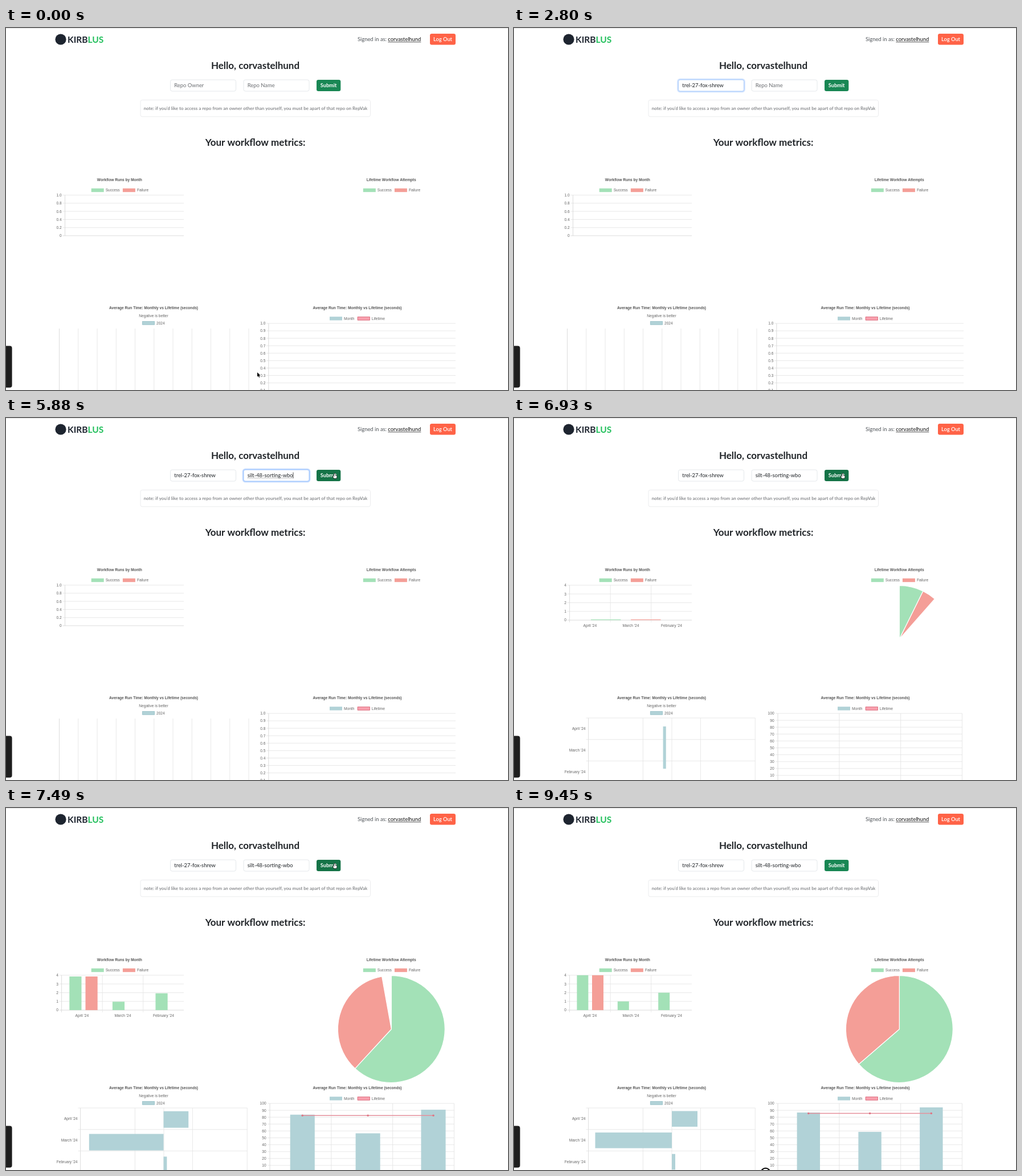
Write an HTML page with a canvas that moves like this. It is 881 by 636 pixels and loops after 9.52 s.

```html
<!DOCTYPE html>
<html lang="en">
<head>
<meta charset="utf-8">
<title>Workflow metrics</title>
<style>
html, body { margin: 0; width: 100%; height: 100%; overflow: hidden; background: #fff; }
canvas { display: block; width: 881px; height: 636px; }
</style>
</head>
<body>
<canvas id="stage"></canvas>
<script>
const W = 881, H = 636, LOOP = 9520, STEP = 70;
const canvas = document.getElementById('stage');
const ctx = canvas.getContext('2d');
const ratio = window.devicePixelRatio || 1;
canvas.width = W * ratio;
canvas.height = H * ratio;

const UI = 'Lato, "Open Sans", sans-serif';
const PLOT = '"Liberation Sans", Arial, sans-serif';
const INK = '#212529', GREEN = '#a3e1b7', RED = '#f49e97', TEAL = '#b1d2d7';
const PINK = '#f9a0ae', ROSE = '#dd7685', GRID = '#e3e3e3', AXIS = '#d4d4d4';
const USER = 'corvastelhund', OWNER = 'trel-27-fox-shrew', REPO = 'silt-48-sorting-wbo';
const MONTHS = ["April '24", "March '24", "February '24"];
const LOADED = 6930;

// Pointer route: time, x, y
const ROUTE = [
  [0, 441, 605], [140, 470, 540], [280, 640, 260], [385, 756, 24], [490, 650, 40],
  [630, 420, 95], [700, 351, 110], [770, 351, 110], [980, 337, 99.5], [1470, 337, 99.5],
  [1750, 520, 80], [1960, 886, 27], [3570, 886, 24], [3640, 778, 25], [3780, 650, 60],
  [3990, 480, 108], [4060, 457.7, 105], [5110, 457.7, 105], [5180, 461, 108],
  [5390, 510, 117], [5600, 560, 107], [5740, 577, 97.7], [8120, 577, 97.7],
  [8190, 575, 105], [8540, 520, 330], [8820, 450, 590], [8890, 441, 623], [8960, 441.5, 641]
];

const clamp = v => Math.max(0, Math.min(1, v));
const within = (t, a, b) => t >= a && t < b;
const mix = (a, b, p) => a + (b - a) * p;
function ramp(t, a, b) {
  const p = clamp((t - a) / (b - a));
  return p * p * (3 - 2 * p);
}
const easeOut = p => 1 - Math.pow(1 - clamp(p), 4);

function text(str, x, y, size, color, align = 'left', weight = 400, family = UI) {
  ctx.font = `${weight} ${size}px ${family}`;
  ctx.textAlign = align;
  ctx.fillStyle = color;
  ctx.fillText(str, x, y);
  return ctx.measureText(str).width;
}
// Chart text, placed by its vertical middle
const label = (str, x, y, align = 'left', weight = 400) =>
  text(str, x, y + 2.4, 6.6, weight > 400 ? '#555' : '#666', align, weight, PLOT);

function rect(x, y, w, h, color) {
  ctx.fillStyle = color;
  ctx.fillRect(x, y, w, h);
}
function line(x1, y1, x2, y2, color = GRID, width = 0.8) {
  ctx.strokeStyle = color;
  ctx.lineWidth = width;
  ctx.beginPath();
  ctx.moveTo(x1, y1);
  ctx.lineTo(x2, y2);
  ctx.stroke();
}
function box(x, y, w, h, r, fill, stroke, width = 0.8) {
  ctx.beginPath();
  ctx.roundRect(x, y, w, h, r);
  if (fill) { ctx.fillStyle = fill; ctx.fill(); }
  if (stroke) { ctx.strokeStyle = stroke; ctx.lineWidth = width; ctx.stroke(); }
}
function disc(x, y, r, color) {
  ctx.fillStyle = color;
  ctx.beginPath();
  ctx.arc(x, y, r, 0, 7);
  ctx.fill();
}
function clipped(x, y, w, h, draw) {
  ctx.save();
  ctx.beginPath();
  ctx.rect(x, y, w, h);
  ctx.clip();
  draw();
  ctx.restore();
}
function legend(x, y, color, name, border) {
  rect(x, y - 3.2, 22, 6.4, color);
  if (border) {
    ctx.strokeStyle = border;
    ctx.lineWidth = 1;
    ctx.strokeRect(x + 0.4, y - 2.8, 21.2, 5.6);
  }
  label(name, x + 25, y);
}

function pointerAt(t) {
  let i = 0;
  while (i < ROUTE.length - 1 && ROUTE[i + 1][0] <= t) i++;
  const a = ROUTE[i], b = ROUTE[i + 1] || a;
  const p = b === a ? 0 : (t - a[0]) / (b[0] - a[0]);
  return { x: mix(a[1], b[1], p), y: mix(a[2], b[2], p) };
}
const over = (p, x, y, w, h) => p.x >= x && p.x <= x + w && p.y >= y && p.y <= y + h;

function field(x, value, hint, glow) {
  if (glow > 0) box(x - 1.1, 89.9, 117.2, 22.2, 4, null, `rgba(13,110,253,${0.25 * glow})`, 2.4);
  const edge = [mix(222, 134, glow), mix(226, 183, glow), mix(230, 254, glow)].map(Math.round);
  box(x, 91, 115, 20, 3.2, '#fff', `rgb(${edge})`);
  text(value || hint, x + 6.8, 104.2, 9.4, value ? INK : '#6b6e72');
  return value ? x + 6.8 + ctx.measureText(value).width : x + 7;
}
const caret = x => line(x + 0.4, 95.5, x + 0.4, 106, '#222', 0.8);

function header() {
  rect(0, 0, W, 1, '#e4e4e4');
  disc(96, 20, 9.6, '#1e2530');
  const w = text('KIRB', 108, 25.6, 15.5, '#1e2530', 'left', 700);
  text('LUS', 108 + w, 25.6, 15.5, '#21bf5b', 'left', 700);
  text('Signed in as:', 617, 23.2, 9.4, '#50555a');
  const u = text(USER, 670.3, 23.2, 9.4, '#111');
  line(670.3, 24.7, 670.3 + u, 24.7, '#111', 0.7);
  box(744, 10, 45, 19.5, 3.2, '#ff6347');
  text('Log Out', 766.5, 23.2, 9.3, '#fff', 'center', 600);
  text('Hello, ' + USER, 437.5, 71.7, 17, INK, 'center', 700);
  box(236, 126.5, 403.5, 29.3, 3.2, null, '#e6e8ea');
  text("note: if you'd like to access a repo from an owner other than yourself, you must be apart of that repo on RepVak",
    438, 143.8, 8, '#7b7d80', 'center', 600);
  text('Your workflow metrics:', 437.5, 206.6, 17, INK, 'center', 700);
}

function form(t, p) {
  const ownerGlow = ramp(t, 1150, 1260) - ramp(t, 2770, 2870) + ramp(t, 3600, 3740) - ramp(t, 4130, 4270);
  const repoGlow = ramp(t, 4130, 4270) - ramp(t, 6060, 6230);
  const ownerEnd = field(288.5, t >= 1610 ? OWNER : '', 'Repo Owner', clamp(ownerGlow));
  const repoEnd = field(417, t >= 4830 ? REPO : '', 'Repo Name', clamp(repoGlow));
  if (within(t, 1120, 2100) || within(t, 2590, 2800) || within(t, 3640, 4130)) caret(ownerEnd);
  if (within(t, 4130, 4620) || within(t, 4830, 5320) || within(t, 5880, 6090)) caret(repoEnd);
  if (within(t, 4830, 6090)) {
    ctx.setLineDash([0.9, 0.9]);
    line(423.8, 105.6, repoEnd, 105.6, '#777', 0.9);
    ctx.setLineDash([]);
  }
  const press = ramp(t, 6060, 6160) - ramp(t, 6300, 6440);
  if (press > 0) box(543.9, 89.9, 44.2, 22.2, 4, null, `rgba(60,153,110,${0.5 * press})`, 2.2);
  box(545, 91, 42.3, 20, 3.2, over(p, 545, 91, 42, 20) ? '#157347' : '#198754');
  text('Submit', 566.1, 104.2, 9.1, '#fff', 'center', 700);
}

function runsChart(t) {
  label('Workflow Runs by Month', 199.3, 267, 'center', 700);
  legend(149.7, 285, GREEN, 'Success');
  legend(204.9, 285, RED, 'Failure');
  if (t < LOADED) {
    for (let i = 0; i <= 5; i++) {
      const y = 293.6 + i * 14.27;
      label(i < 5 ? (1 - i / 5).toFixed(1) : '0', 97.6, y, 'right');
      line(99.5, y, 312, y, i < 5 ? GRID : AXIS);
    }
    line(103.5, 293.6, 103.5, 369 - 4, AXIS);
    return;
  }
  for (let i = 0; i <= 4; i++) {
    const y = 293.8 + i * 15.32;
    label(4 - i, 92, y, 'right');
    line(93.5, y, 312, y, i < 4 ? GRID : AXIS);
  }
  for (let i = 0; i < 3; i++) {
    const x = 97.6 + i * 71.55;
    line(x, 293.8, x, 359, i ? GRID : AXIS);
    label(MONTHS[i], x + 35.8, 365, 'center');
  }
  const e = easeOut((t - 6925) / 1000);
  const w = mix(53, 20, e);
  const bar = (from, to, value, color) => {
    const h = value * 15.32 * e;
    rect(mix(from, to, e) - w / 2, 355.1 - h, w, h, color);
  };
  clipped(97.6, 293, 214.4, 63, () => {
    [4, 1, 2].forEach((v, i) => bar(162 + i * 188, 120.4 + i * 71.4, v, GREEN));
    bar(233, 147, 4, RED);
  });
}

function pieChart(t) {
  label('Lifetime Workflow Attempts', 676.2, 267, 'center', 700);
  legend(626.8, 285, GREEN, 'Success');
  legend(681.9, 285, RED, 'Failure');
  if (t < LOADED) return;
  const turn = easeOut((t - 6900) / 1000) * Math.PI * 2;
  let from = -Math.PI / 2;
  [[7, GREEN], [4, RED]].forEach(([share, color]) => {
    const to = from + turn * share / 11;
    ctx.beginPath();
    ctx.moveTo(676.3, 388.5);
    ctx.arc(676.3, 388.5, 94, from, to);
    ctx.closePath();
    ctx.fillStyle = color;
    ctx.fill();
    ctx.strokeStyle = '#fff';
    ctx.lineWidth = 1.2;
    ctx.lineJoin = 'bevel';
    ctx.stroke();
    from = to;
  });
}

function changeChart(t) {
  label('Average Run Time: Monthly vs Lifetime (seconds)', 259, 492, 'center', 700);
  label('Negative is better', 259, 505.3, 'center');
  legend(239, 518.3, TEAL, '2024', '#a2c7cd');
  if (t < LOADED) {
    for (let i = 0; i <= 10; i++) {
      const x = 93.5 + i * 33.25;
      line(x, 528, x, H, i ? GRID : AXIS);
    }
    return;
  }
  [130.6, 226.4, 277, 327.4, 423.3].forEach((x, i) => line(x, 527, x, H, i ? GRID : AXIS));
  for (let i = 0; i < 3; i++) {
    const y = 527 + i * 37.8;
    line(126.5, y, 423.3, y);
    label(MONTHS[i], 125.5, y + 18.7, 'right');
  }
  const e = easeOut((t - 6900) / 1000);
  const base = mix(259.6, 277, e), h = mix(80.4, 27.5, e);
  clipped(130.6, 527, 293, 109, () => {
    [45, -134.5, 6].forEach((v, i) => {
      const y = mix(583.3 + i * 114.4, 546.2 + i * 37.7, e);
      rect(base + Math.min(0, v * e), y - h / 2, Math.abs(v * e), h, TEAL);
    });
  });
}

function timeChart(t) {
  label('Average Run Time: Monthly vs Lifetime (seconds)', 616.5, 492, 'center', 700);
  legend(568, 510.4, TEAL, 'Month');
  legend(616.8, 510.4, PINK, 'Lifetime', ROSE);
  const full = t >= LOADED;
  const left = full ? 463 : 460.8, right = full ? 786.5 : 789;
  for (let i = 0; i < 10; i++) {
    const y = 519 + i * (full ? 12.1 : 13.07);
    label(full ? 100 - i * 10 : (1 - i / 10).toFixed(1), full ? 456.6 : 455.3, y, 'right');
    line(left - 4, y, right, y);
  }
  line(left, 519, left, H, AXIS);
  if (!full) return;
  for (let i = 1; i <= 3; i++) line(463 + i * 107.83, 519, 463 + i * 107.83, H);
  const e = easeOut((t - 6925) / 1000);
  const w = mix(115, 40.4, e), y = 640 - 103.5 * e;
  const xs = [0, 1, 2].map(i => mix(613 + i * 307, 516.8 + i * 107.75, e));
  clipped(463, 515, 326, 121, () => {
    [105, 71, 114].forEach((v, i) => rect(xs[i] - w / 2, 640 - v * e, w, v * e, TEAL));
    line(xs[0], y, xs[2], y, '#e58f9b', 1.6);
    xs.forEach(x => disc(x, y, 1.8, ROSE));
  });
}

function shape(points, x, y) {
  ctx.beginPath();
  points.forEach(([dx, dy]) => ctx.lineTo(x + dx, y + dy));
  ctx.closePath();
}
function pointer(t, p) {
  if (within(t, 4550, 5180)) return;
  const { x, y } = p;
  ctx.lineJoin = 'round';
  if (over(p, 288, 91, 115, 20) || over(p, 417, 91, 115, 20)) {
    line(x, y - 3.5, x, y + 3.5, '#333', 0.8);
    line(x - 1.7, y - 4, x + 1.7, y - 4, '#333', 0.7);
    line(x - 1.7, y + 4, x + 1.7, y + 4, '#333', 0.7);
  } else if (over(p, 545, 91, 42, 20) || over(p, 744, 10, 45, 20)) {
    shape([[-1, 0], [0.3, 0], [0.5, 3], [3.4, 3.8], [3.6, 6], [2.6, 8.4], [-1.3, 8.4], [-3.6, 5], [-2.8, 4.3], [-1, 5.6]], x, y);
    ctx.strokeStyle = '#111';
    ctx.lineWidth = 1.3;
    ctx.stroke();
    ctx.fillStyle = '#fff';
    ctx.fill();
  } else {
    shape([[0, 0], [0, 7.8], [1.8, 6.2], [3, 9], [4.3, 8.4], [3.1, 5.7], [5.5, 5.5]], x, y);
    ctx.strokeStyle = '#fff';
    ctx.lineWidth = 1.3;
    ctx.stroke();
    ctx.fillStyle = '#000';
    ctx.fill();
  }
}
function clickRing(t, p) {
  const spread = within(t, 6090, 6300) ? (t - 6090) / 210 : 0;
  if (!(within(t, 1120, 1260) || within(t, 4060, 4200) || within(t, 6090, 6300) || t >= 9450)) return;
  ctx.strokeStyle = `rgba(0,0,0,${1 - spread})`;
  ctx.lineWidth = 2;
  ctx.beginPath();
  ctx.arc(p.x, p.y, 8.2 + spread * 12, 0, 7);
  ctx.stroke();
}

function draw(t) {
  const p = pointerAt(t);
  ctx.setTransform(ratio, 0, 0, ratio, 0, 0);
  rect(0, 0, W, H, '#fff');
  header();
  form(t, p);
  runsChart(t);
  pieChart(t);
  changeChart(t);
  timeChart(t);
  box(-6, 558.5, 16.6, 73.3, 4, '#1e1e1e');
  pointer(t, p);
  clickRing(t, p);
}

const start = performance.now();
function tick() {
  const t = Math.max(0, performance.now() - start) % LOOP;
  draw(Math.floor(t / STEP) * STEP);
  requestAnimationFrame(tick);
}
tick();
</script>
</body>
</html>
```
